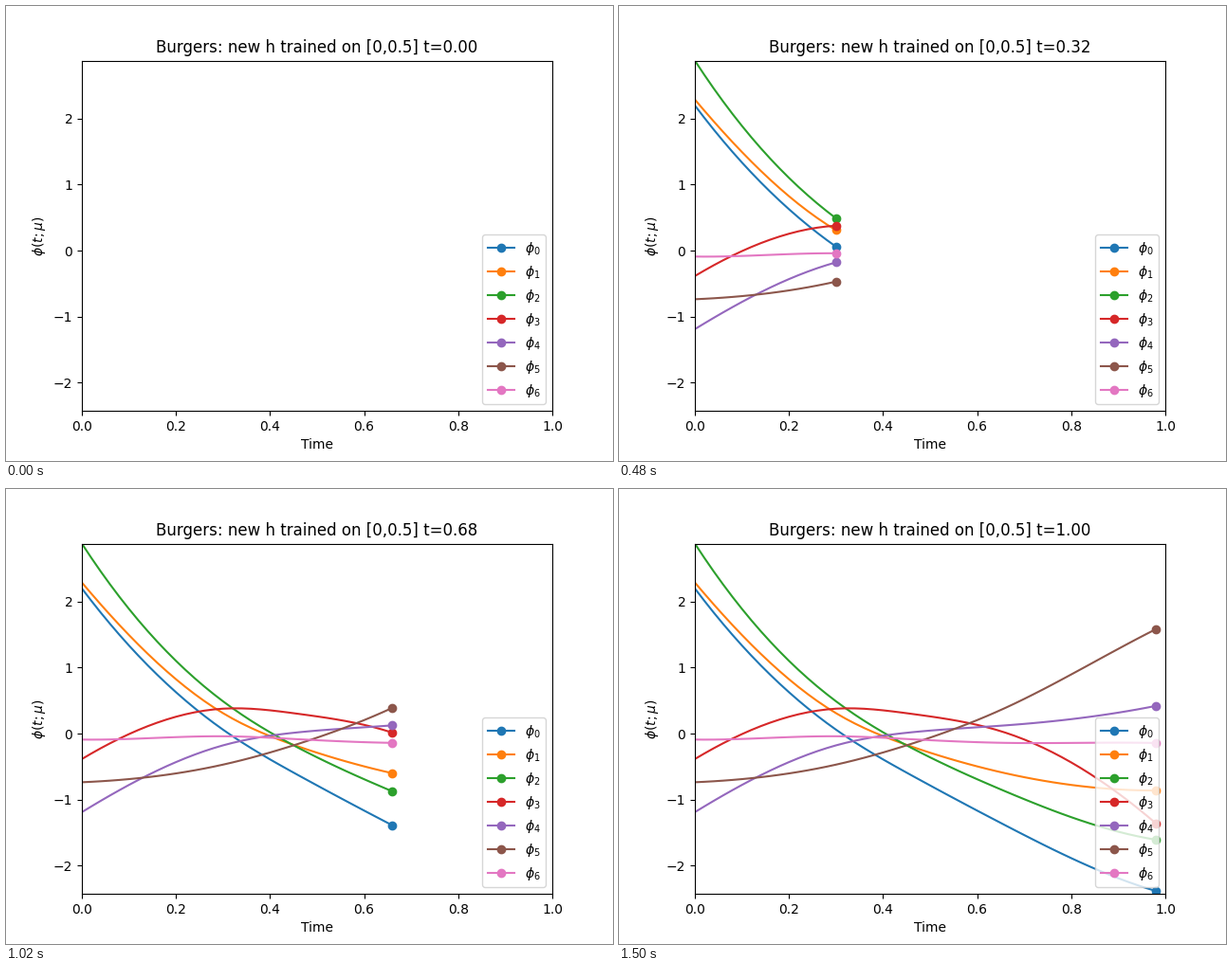
Write a matplotlib script that moves like this. It is 640 px wide and 480 px high and loops after 1530 ms.

```python
import numpy as np
import matplotlib.pyplot as plt
from matplotlib.animation import FuncAnimation

DT = 0.02
STEPS = 51

# A few key points per mode; a cubic spline passes through them.
KEY_TIMES = np.array([0, .14, .30, .46, .66, .78, .98])
MODES = [
    [2.20, 1.035, .06, -.63, -1.39, -1.82, -2.385],
    [2.29, 1.21, .31, -.195, -.60, -.758, -.862],
    [2.88, 1.553, .49, -.215, -.875, -1.215, -1.608],
    [-.385, .113, .378, .30, .015, -.357, -1.36],
    [-1.19, -.63, -.178, .02, .125, .203, .42],
    [-.737, -.66, -.47, -.155, .39, .82, 1.583],
    [-.09, -.07, -.04, -.085, -.14, -.142, -.142],
]


def spline_basis(t):
    """Cubic powers plus one cubic ramp per inner knot (not-a-knot ends)."""
    powers = [t ** n for n in range(4)]
    ramps = [np.maximum(t - knot, 0) ** 3 for knot in KEY_TIMES[2:-2]]
    return np.column_stack(powers + ramps)


times = np.arange(STEPS) * DT
weights = np.linalg.solve(spline_basis(KEY_TIMES), np.transpose(MODES))
curves = (spline_basis(times) @ weights).T

fig, ax = plt.subplots(figsize=(6.4, 4.8), dpi=100)
# Only the newest point of each line carries a marker.
lines = [ax.plot([], [], marker="o", markevery=(-1, 1), label=rf"$\phi_{i}$")[0]
         for i in range(len(curves))]
ax.set_xlim(0, 1)
ax.set_ylim(-2.43, 2.88)
ax.set_xlabel("Time")
ax.set_ylabel(r"$\phi(t;\mu)$")
ax.legend(loc="lower right")
title = ax.set_title("")


def update(step):
    for line, curve in zip(lines, curves):
        line.set_data(times[:step], curve[:step])
    title.set_text(f"Burgers: new h trained on [0,0.5] t={step * DT:.2f}")
    return [*lines, title]


anim = FuncAnimation(fig, update, frames=STEPS, interval=30,
                     repeat=True, repeat_delay=0, blit=False)
plt.show()
```
